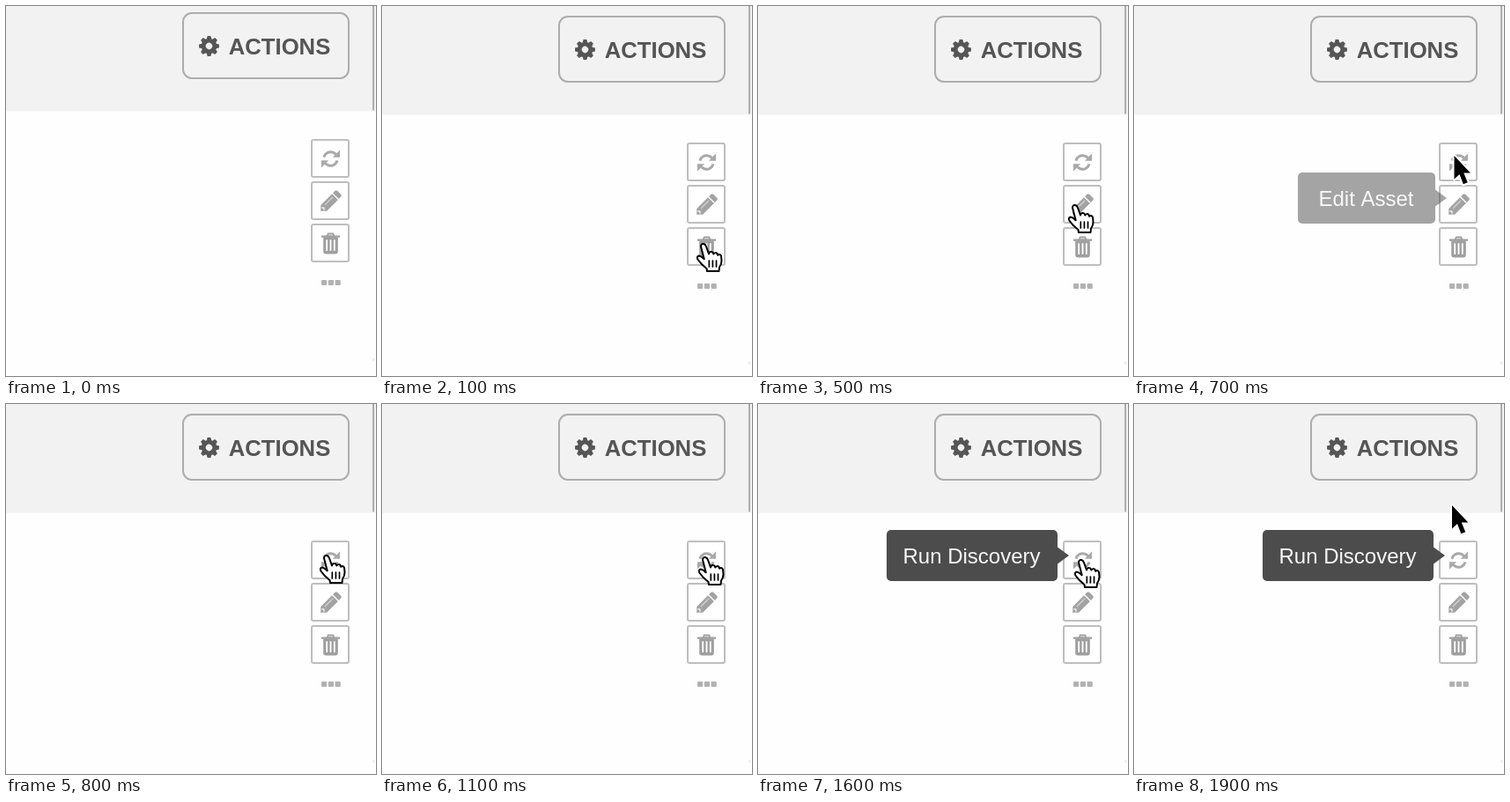
Recreate the animation shown at these times as an HTML page with a canvas. Size 420x420 px, loop 2000 ms.

```html
<!DOCTYPE html>
<html lang="en">
<head>
<meta charset="utf-8">
<title>Asset actions</title>
<style>
  html, body { margin: 0; width: 100%; height: 100%; overflow: hidden; background: #fff; }
  canvas { display: block; width: 420px; height: 420px; }
</style>
</head>
<body>
<canvas id="stage" width="420" height="420"></canvas>
<script>
const ctx = document.getElementById('stage').getContext('2d');
const LOOP = 2000;
const FONT = '"Liberation Sans", Arial, sans-serif';
const ICON = '#a9a9a9';

const tips = {
  del: { text: 'Delete', x: 230, y: 239, w: 116 },
  edit: { text: 'Edit Asset', x: 186, y: 189, w: 156 },
  run: { text: 'Run Discovery', x: 146, y: 143, w: 194 }
};

// start time, cursor, hotspot x, hotspot y, tooltip, tooltip opacity
const steps = [
  [0, null, 0, 0, null, 0],
  [100, hand, 365, 270, null, 0],
  [200, hand, 365, 268, 'del', 1],
  [300, arrow, 361, 237, 'del', 1],
  [400, hand, 360, 228, 'del', 0.5],
  [500, hand, 360, 226, null, 0],
  [600, hand, 360, 226, 'edit', 1],
  [700, arrow, 363.5, 170, 'edit', 0.5],
  [800, hand, 364, 172, null, 0],
  [1100, hand, 367, 174, null, 0],
  [1200, hand, 367, 175, 'run', 0.5],
  [1300, hand, 367, 176, 'run', 1],
  [1500, hand, 367, 177, 'run', 1],
  [1700, arrow, 365, 162, 'run', 1],
  [1800, arrow, 363, 138, 'run', 1],
  [1900, arrow, 361, 115, 'run', 1]
];

function rect(x, y, w, h, color) {
  ctx.fillStyle = color;
  ctx.fillRect(x, y, w, h);
}

function round(x, y, w, h, r) {
  ctx.beginPath();
  ctx.roundRect(x, y, w, h, r);
}

function poly(...pts) {
  ctx.beginPath();
  for (let i = 0; i < pts.length; i += 2) ctx.lineTo(pts[i], pts[i + 1]);
  ctx.closePath();
}

function at(x, y, draw, angle = 0) {
  ctx.save();
  ctx.translate(x, y);
  ctx.rotate(angle);
  draw();
  ctx.restore();
}

function label(text, x, y, font, color) {
  ctx.font = font + ' ' + FONT;
  ctx.textAlign = 'center';
  ctx.fillStyle = color;
  ctx.fillText(text, x, y);
}

function gear() {
  ctx.fillStyle = '#555';
  ctx.beginPath();
  ctx.arc(0, 0, 8.8, 0, 7);
  ctx.arc(0, 0, 3.7, 7, 0, true);
  ctx.fill('evenodd');
  for (let i = 0; i < 8; i++) {
    ctx.rotate(Math.PI / 4);
    poly(-2.8, -7.8, -1.9, -11.4, 1.9, -11.4, 2.8, -7.8);
    ctx.fill();
  }
}

function refresh() {
  ctx.strokeStyle = ctx.fillStyle = ICON;
  ctx.lineWidth = 3.1;
  for (let i = 0; i < 2; i++) {
    ctx.beginPath();
    ctx.arc(0, 0, 7.8, Math.PI * 1.08, Math.PI * 1.8);
    ctx.stroke();
    poly(10.5, -10, 10.5, -1.8, 2.3, -1.8);
    ctx.fill();
    ctx.rotate(Math.PI);
  }
}

function pencil() {
  ctx.fillStyle = '#a3a3a3';
  poly(-16, 0, -11, -4.8, 7, -4.8, 7, 4.8, -11, 4.8);
  ctx.fill();
  round(8.4, -4.8, 5.3, 9.6, [0, 2, 2, 0]);
  ctx.fill();
  rect(-8, -2, 13, 1.1, 'rgba(255,255,255,.6)');
  ctx.strokeStyle = '#fff';
  ctx.lineWidth = 1.2;
  ctx.beginPath();
  ctx.moveTo(-12.4, -2);
  ctx.lineTo(-10.8, 0);
  ctx.lineTo(-12.4, 2);
  ctx.stroke();
}

function trash() {
  ctx.strokeStyle = ctx.fillStyle = '#9f9f9f';
  ctx.lineWidth = 1.8;
  poly(-4, -8, -2.8, -11, 2.8, -11, 4, -8);
  ctx.stroke();
  ctx.fillRect(-10.5, -9, 21, 2.3);
  round(-8.3, -7, 16.6, 19, [0, 0, 3, 3]);
  ctx.fill();
  for (const x of [-4.3, 0, 4.3]) rect(x - 0.9, -4.2, 1.8, 12.6, '#fff');
}

function toolButton(y, icon, angle) {
  round(347, y + 1, 42, 42, 2);
  ctx.fillStyle = '#fff';
  ctx.fill();
  ctx.strokeStyle = '#bebebe';
  ctx.lineWidth = 2;
  ctx.stroke();
  at(368.5, y + 22.5, icon, angle);
}

function page() {
  rect(0, -4, 420, 428, '#fefefe');
  rect(0, -4, 420, 127.5, '#f2f2f2');
  rect(416, -4, 2, 126.5, '#adadad');
  rect(416, 404, 2, 3, '#eee');

  round(201, 12, 188, 74, 10);
  ctx.strokeStyle = '#adadad';
  ctx.lineWidth = 2;
  ctx.stroke();
  at(230.5, 49.5, gear);
  label('ACTIONS', 310.5, 58.5, 'bold 25.7px', '#555');

  toolButton(155, refresh);
  toolButton(203, pencil, -Math.PI / 4);
  toolButton(251, trash);
  ctx.fillStyle = '#b2b2b2';
  for (let i = 0; i < 3; i++) {
    round(358 + i * 7.8, 315, 6.2, 6, 1);
    ctx.fill();
  }
}

function tooltip({ text, x, y, w }, alpha) {
  const right = x + w;
  ctx.save();
  ctx.globalAlpha = alpha;
  ctx.fillStyle = '#4c4c4c';
  round(x, y, w, 58, 5);
  ctx.fill();
  poly(right, y + 19.5, right + 13, y + 29, right, y + 38.5);
  ctx.fill();
  ctx.globalAlpha = 1;
  label(text, x + w / 2 - 0.5, y + 38, '24px', '#f8f8f8');
  ctx.restore();
}

function arrow() {
  poly(0, 0, 0, 26.5, 6, 21, 10.3, 32.3, 15.2, 30.3, 10.8, 19.6, 18.4, 19.6);
  ctx.lineJoin = 'round';
  ctx.strokeStyle = '#fff';
  ctx.lineWidth = 4;
  ctx.stroke();
  ctx.fillStyle = '#000';
  ctx.fill();
}

const handShape = new Path2D(
  'M5 4Q5 .8 8 1Q10 1.3 11 4L14 12.5Q15 9 18 10.3Q19 11 19.3 12.5' +
  'Q21.5 10 23.5 12L24 13.8Q27 12 28 15L28.5 20Q28.5 24 26 27.5' +
  'L25.5 32H12L11.5 29Q5 24 1.3 18.5Q0 15.2 2.7 14.6Q5.5 15 8.7 18.2Z'
);

function hand() {
  ctx.translate(-8, -1);
  ctx.lineJoin = ctx.lineCap = 'round';
  ctx.fillStyle = '#fff';
  ctx.fill(handShape);
  ctx.strokeStyle = '#000';
  ctx.lineWidth = 2;
  ctx.stroke(handShape);
  ctx.lineWidth = 1.7;
  for (const x of [14.3, 18.4, 22.5]) {
    ctx.beginPath();
    ctx.moveTo(x, 20);
    ctx.lineTo(x, 27);
    ctx.stroke();
  }
}

function render(now) {
  const t = now % LOOP;
  const [, cursor, x, y, tip, alpha] = steps.findLast(s => s[0] <= t);
  at(0, t < 100 ? -4 : 0, page);
  if (tip) tooltip(tips[tip], alpha);
  if (cursor) at(x, y, cursor);
}

const start = performance.now();
function tick() {
  render(performance.now() - start);
  requestAnimationFrame(tick);
}
tick();
</script>
</body>
</html>
```
